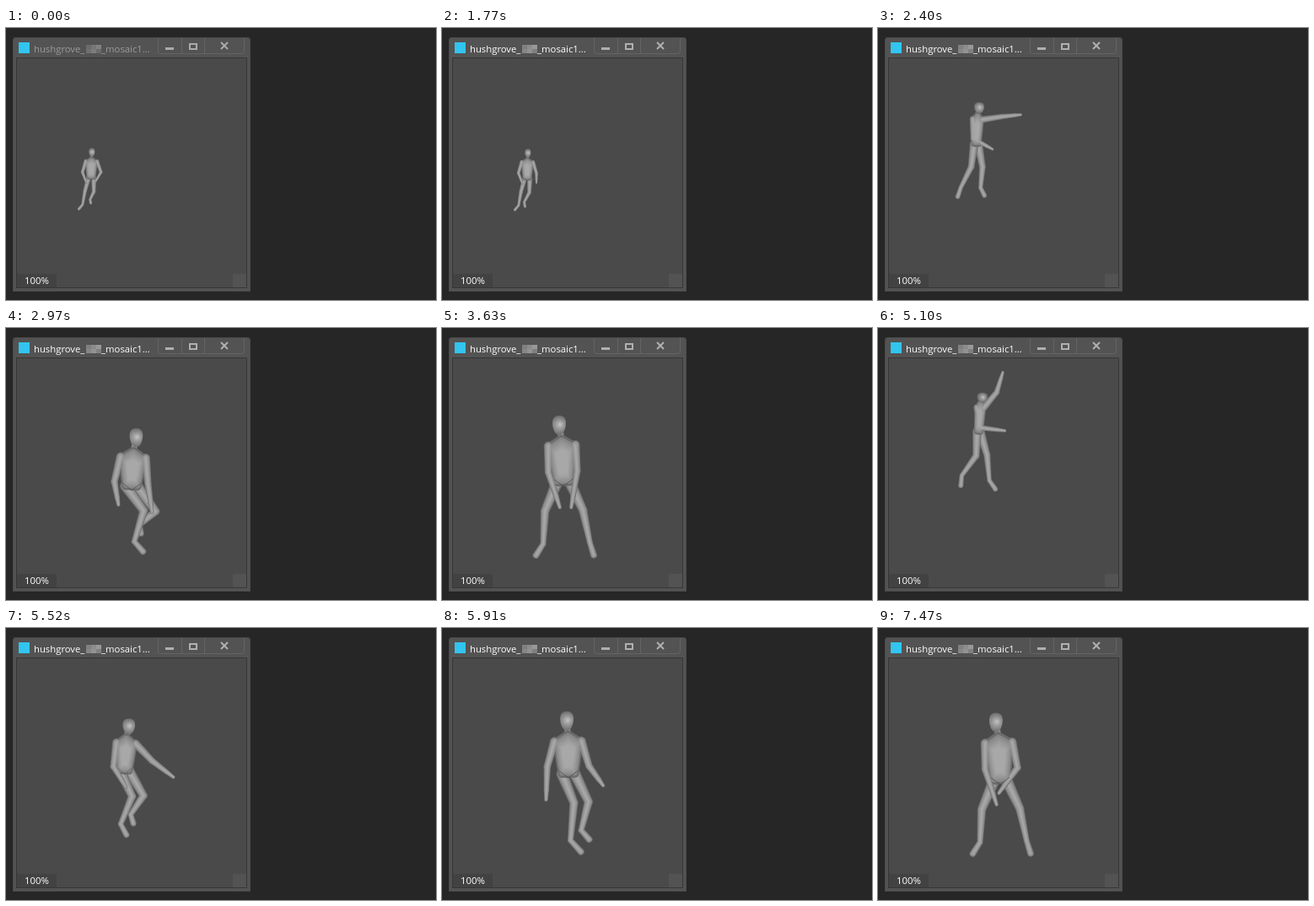
These frames come from a looping animation (510x323 px, 8000 ms). An HTML page with a canvas:

```html
<!DOCTYPE html>
<html lang="en">
<head>
<meta charset="utf-8">
<title>Mannequin leap</title>
<style>
  html, body { margin: 0; width: 510px; height: 323px; overflow: hidden; background: #262626; }
  canvas { position: absolute; left: 0; top: 0; }
  span {
    position: absolute; line-height: 16px; white-space: pre;
    font-family: "Open Sans", "Noto Sans", sans-serif; color: #fff;
  }
  .title { top: 17px; font-size: 11.3px; }
  #zoom { left: 22px; top: 292px; font-size: 11.4px; }
</style>
</head>
<body>
<canvas id="stage" width="510" height="323"></canvas>
<span class="title" style="left:33px">hushgrove_</span>
<span class="title" style="left:113px">_mosaic1...</span>
<span id="zoom">100%</span>
<script>
const ctx = document.getElementById('stage').getContext('2d');
const titles = document.querySelectorAll('.title');

const LOOP = 8000, FOCUS = 680;
const START = 1770, STEP = 133.5, LAST = 31, CYCLE = 2700;
const CUT = 2340;                 // phase where the figure returns to the distance
const REST = -130, STAND = 1680, STAND_AT = 7470;

// Bone lengths at size 1
const ARM = [31, 30, 14], LEG = [37, 39, 16];
const SPINE = 45, NECK = 24, SHOULDER = 16, HIP = 7.5;

// Limbs are [upper angle, lower angle, reach of the lower part];
// angles in degrees from straight down, positive to the right.
const run = {
  hip: [101, 178], size: .44, lean: 1, turn: .95, spine: 1, nod: 1, feet: [-40, 10],
  armL: [-17, 20, .7], armR: [20, -30, .7], legL: [-15, -10, .95], legR: [0, -25, .6]
};
const jog = { ...run, hip: [101, 179], armR: [17, 0, .6], legR: [-2, -28, .75] };
const spring = { ...run, hip: [112, 166], size: .68, turn: .7 };
const reach = {
  hip: [119, 122], size: .78, lean: 4, turn: .3, spine: .8, nod: .65, feet: [-6, 35],
  armL: [10, 84, .85], armR: [142, 165, .72], legL: [-3, -36, .95], legR: [16, 6, 1]
};
const land = {
  hip: [149, 188], size: .98, lean: 3, turn: .95, spine: .78, nod: 1, feet: [41, 9],
  armL: [-14, 10, .65], armR: [5, 8, .8], legL: [36, -17, 1], legR: [36, -50, .65]
};
const rise = {
  hip: [150, 173], size: 1, lean: -1, turn: 1, spine: .86, nod: 1, feet: [42, 41],
  armL: [-16, -2, .9], armR: [17, 36, .65], legL: [22, -5, 1.15], legR: [26, -14, .9]
};
const crouch = {
  hip: [145, 181], size: 1, lean: -2.5, turn: 1, spine: 1, nod: 1, feet: [-32, 17],
  armL: [0, 18, 1], armR: [12, -36, .85], legL: [-23, -3, 1], legR: [25, 12, 1]
};
const relax = { ...crouch, hip: [144, 183], spine: .97, armR: [4, -9, 1] };

const keys = [
  [REST, run], [0, jog], [360, spring], [630, reach],
  [1200, land], [1440, rise], [STAND, crouch], [1870, relax]
];

const blend = (a, b, u) => Array.isArray(a)
  ? a.map((v, i) => blend(v, b[i], u))
  : a + (b - a) * u;

function poseAt(phase) {
  const i = keys.findIndex(k => k[0] >= phase);
  if (i === 0) return run;
  if (i < 0) return relax;
  const [t0, a] = keys[i - 1], [t1, b] = keys[i];
  const u = (phase - t0) / (t1 - t0), pose = {};
  for (const name in a) pose[name] = blend(a[name], b[name], u);
  return pose;
}

// The viewport redraws at a fixed step, then freezes
function phaseAt(time) {
  if (time < START) return REST;
  if (time >= STAND_AT) return STAND;
  const n = Math.min(LAST, Math.floor((time - START + 15) / STEP));
  const p = n * STEP % CYCLE;
  return p > CUT ? p - CYCLE : p;
}

function along([x, y], degrees, length) {
  const a = degrees * Math.PI / 180;
  return [x + Math.sin(a) * length, y + Math.cos(a) * length];
}

function joints(start, [upper, lower, stretch], end, bones, size) {
  const mid = along(start, upper, bones[0] * size);
  const low = along(mid, lower, bones[1] * size * stretch);
  return [start, mid, low, along(low, end, bones[2] * size * stretch)];
}

function capsule(a, b, ra, rb) {
  const turn = Math.atan2(b[1] - a[1], b[0] - a[0]), q = Math.PI / 2;
  ctx.beginPath();
  ctx.arc(a[0], a[1], ra, turn + q, turn + 3 * q);
  ctx.arc(b[0], b[1], rb, turn - q, turn + q);
  ctx.fill();
}

const tube = (points, radii, size) => k => {
  for (let i = 1; i < points.length; i++) {
    capsule(points[i - 1], points[i], radii[i - 1] * size * k, radii[i] * size * k);
  }
};

const trunk = (outline, center, size) => k => {
  ctx.lineWidth = 9.5 * size * k;
  ctx.lineJoin = 'round';
  ctx.beginPath();
  outline.forEach(p => ctx.lineTo(...blend(center, p, .5 + k / 2)));
  ctx.closePath();
  ctx.fill();
  ctx.stroke();
};

// Paint parts as one mass, from a dark rim to a bright core
function shade(...parts) {
  for (let t = 0; t <= 1; t += .2) {
    const v = Math.round(108 + 60 * Math.sqrt(t));
    ctx.fillStyle = ctx.strokeStyle = `rgb(${v},${v},${v})`;
    parts.forEach(part => part(1 - .85 * t));
  }
}

function drawHead([x, y], rx, ry) {
  const g = ctx.createRadialGradient(x + rx * .15, y - ry * .1, 0, x, y, ry);
  g.addColorStop(0, '#c4c4c4');
  g.addColorStop(.35, '#a0a0a0');
  g.addColorStop(1, '#6c6c6c');
  ctx.fillStyle = g;
  for (const d of [rx, -rx]) {
    ctx.beginPath();
    ctx.moveTo(x, y - ry);
    ctx.bezierCurveTo(x + d * .55, y - ry, x + d, y - ry * .8, x + d, y - ry * .25);
    ctx.bezierCurveTo(x + d, y + ry * .2, x + d * .7, y + ry, x, y + ry);
    ctx.lineTo(x - d * .05, y);
    ctx.fill();
  }
}

function drawFigure(p) {
  const s = p.size, up = 180 - p.lean;
  const chest = along(p.hip, up, SPINE * s * p.spine);
  const neck = along(chest, up, 8 * s);
  const head = along(chest, 180 - p.lean * 3, NECK * s * p.nod);
  const side = (c, half) => along(c, 90 - p.lean, half * s * p.turn);
  const [sl, sr] = [side(chest, -SHOULDER), side(chest, SHOULDER)];
  const [hl, hr] = [side(p.hip, -HIP), side(p.hip, HIP)];
  const waist = blend(chest, p.hip, .62);
  const legSize = [7, 5.2, 3.5, 4], armSize = [5.4, 4.3, 3.2, 2.2];

  const leg = (hip, angles, foot) => tube(joints(hip, angles, foot, LEG, s), legSize, s);
  const arm = (top, angles) => tube(joints(top, angles, angles[1], ARM, s), armSize, s);
  shade(leg(hr, p.legR, p.feet[1]));
  shade(leg(hl, p.legL, p.feet[0]));
  shade(tube([head, neck, chest], [3.6, 4, 7], s));

  const body = [neck, side(chest, -13), side(waist, -10), hl, hr, side(waist, 10), side(chest, 13)];
  shade(trunk(body, blend(chest, p.hip, .5), s), arm(sr, p.armR), arm(sl, p.armL));

  ctx.strokeStyle = `rgba(60,60,60,${.6 * p.turn})`;
  ctx.lineWidth = s;
  ctx.beginPath();
  [along(hl, 225, 5 * s), along(p.hip, 0, 5 * s), along(hr, 135, 5 * s)].forEach(q => ctx.lineTo(...q));
  ctx.stroke();
  drawHead(head, 8 * s, 11.5 * s * p.nod);
}

function box(x, y, w, h, color) {
  ctx.fillStyle = color;
  ctx.fillRect(x, y, w, h);
}

function frame(x, y, w, h, color, width = 1, radii = 0) {
  ctx.strokeStyle = color;
  ctx.lineWidth = width;
  ctx.lineJoin = 'miter';
  ctx.beginPath();
  ctx.roundRect(x, y, w, h, radii);
  ctx.stroke();
}

function drawWindow(active) {
  box(0, 0, 510, 323, '#262626');
  ctx.fillStyle = '#535353';
  ctx.beginPath();
  ctx.roundRect(8, 11, 282, 302, [4, 4, 1, 1]);
  ctx.fill();
  frame(8.5, 11.5, 281, 301, '#4a4a4a', 1, [4, 4, 1, 1]);
  box(12, 35, 274, 274, '#4a4a4a');
  frame(12.5, 35.5, 273, 273, '#363636');
  box(13, 292, 47, 16, '#424242');
  box(269, 292, 16, 16, '#535353');

  box(15, 17, 13, 13, '#31c5f0');
  for (let i = 0; i < 6; i++) {
    const v = (active ? 128 : 106) + i * 37 % 5 * 6;
    box(95 + i % 3 * 6, 20 + (i > 2) * 5, 6, 5, `rgb(${v},${v},${v})`);
  }

  frame(180.5, 11.5, 102, 19, '#646464', 1, [0, 0, 3, 3]);
  box(180, 11, 103, 1, '#4a4a4a');
  box(208, 12, 1, 18, '#646464');
  box(235, 12, 1, 18, '#646464');
  const ink = active ? '#b0b0b0' : '#aaa';
  box(189, 23, 10, 3, ink);
  frame(218, 19, 8, 6, ink, 2);
  ctx.beginPath();
  for (const d of [4, -4]) {
    ctx.moveTo(259 - d, 17);
    ctx.lineTo(259 + d, 25);
  }
  ctx.stroke();
}

function draw(time) {
  const active = time >= FOCUS;
  titles.forEach(t => { t.style.color = active ? '#fff' : '#9b9b9b'; });
  drawWindow(active);
  drawFigure(poseAt(phaseAt(time)));
}

const begin = performance.now();
function tick() {
  draw((performance.now() - begin) % LOOP);
  requestAnimationFrame(tick);
}
tick();
</script>
</body>
</html>
```
